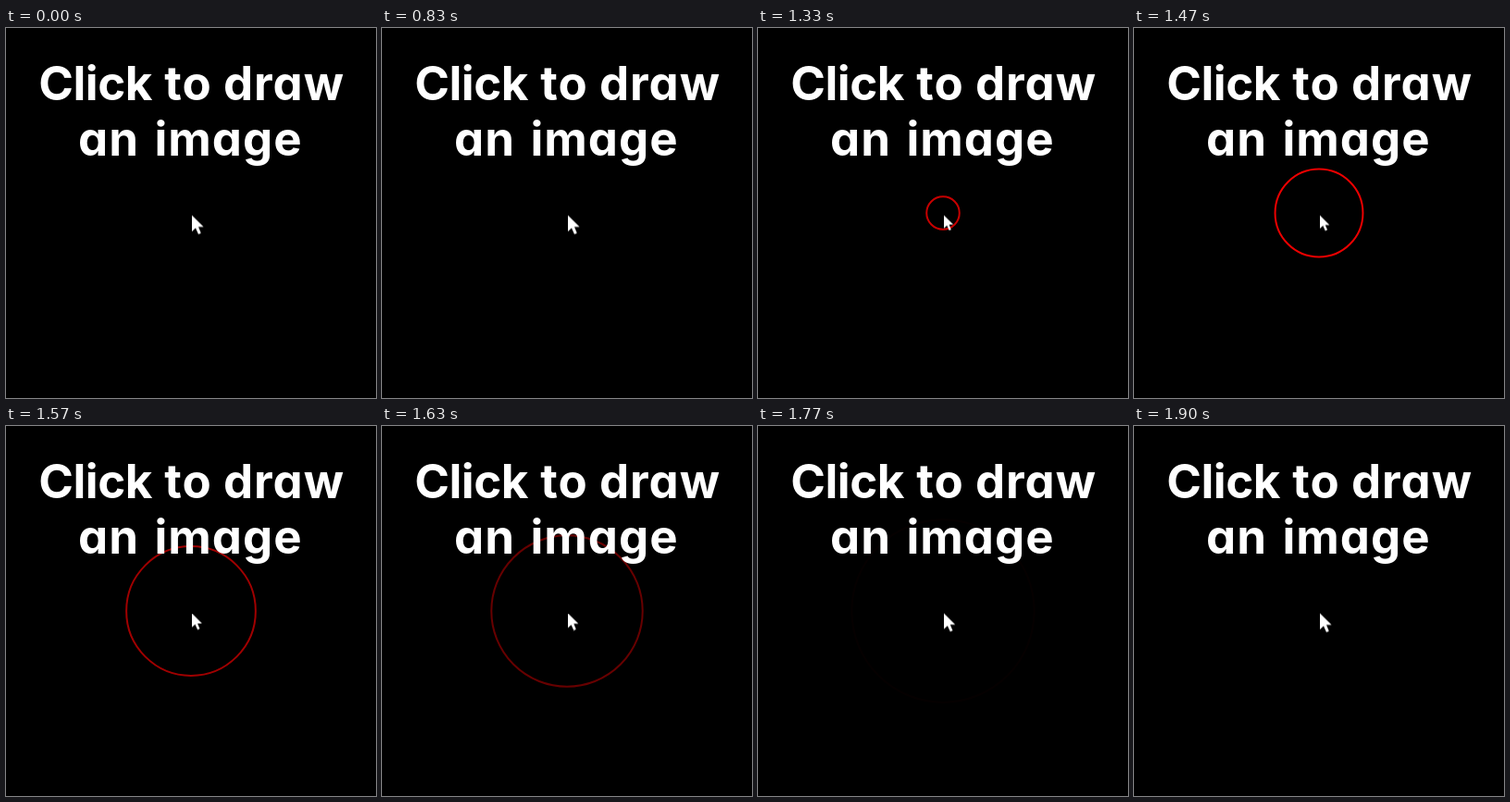
An HTML page for the animation above (4000 ms loop, 400 by 400 pixels).

```html
<!DOCTYPE html>
<html lang="en">
<head>
<meta charset="utf-8">
<title>Click to draw an image</title>
<style>
  html, body { margin: 0; width: 100%; height: 100%; overflow: hidden; background: #000; }
  svg { display: block; width: 100vw; height: 100vh; }
  text {
    font: 680 51px Inter, "Open Sans", sans-serif;
    font-feature-settings: "cv11"; /* single-storey a */
    letter-spacing: 1px;
    text-anchor: middle;
    fill: #fff;
  }
  .tight { letter-spacing: -.5px; }
  #ring { fill: none; stroke: #f00; stroke-width: 2px; opacity: 0; }
  #cursor { fill: #fff; transform-origin: 0 0; }
</style>
</head>
<body>
<svg viewBox="0 0 400 400">
  <circle id="ring" cx="200" cy="200" r="0"/>
  <text class="tight" x="96.5" y="78">Click</text>
  <text x="197" y="78">to</text>
  <text x="300.5" y="78">draw</text>
  <text x="111" y="138">an</text>
  <text x="240.5" y="138">image</text>
  <g transform="translate(201 202.5)">
    <path id="cursor" d="M0 0V17.4L4 13.8L7 20.4L9.8 19.2L7 12.6H12.6Z"/>
  </g>
</svg>
<script>
  const LOOP = 4000;
  const SMOOTH = "cubic-bezier(.333, 0, .667, 1)";

  // steps: [time in ms, value]
  function play(id, prop, steps) {
    const frames = steps.map(([time, value]) => ({
      offset: time / LOOP, [prop]: value, easing: SMOOTH
    }));
    const anim = document.getElementById(id)
      .animate(frames, { duration: LOOP, iterations: Infinity });
    anim.startTime = document.timeline.currentTime;
  }

  play("cursor", "transform", [
    [0, "scale(1)"], [810, "scale(1)"], [1353, "scale(.8)"],
    [1905, "scale(1)"], [LOOP, "scale(1)"]
  ]);
  play("ring", "r", [
    [0, "0px"], [1156, "0px"], [1806, "99.5px"], [LOOP, "99.5px"]
  ]);
  play("ring", "opacity", [
    [0, 0], [1156, 0], [1406, 1], [1806, 0], [LOOP, 0]
  ]);
</script>
</body>
</html>
```
